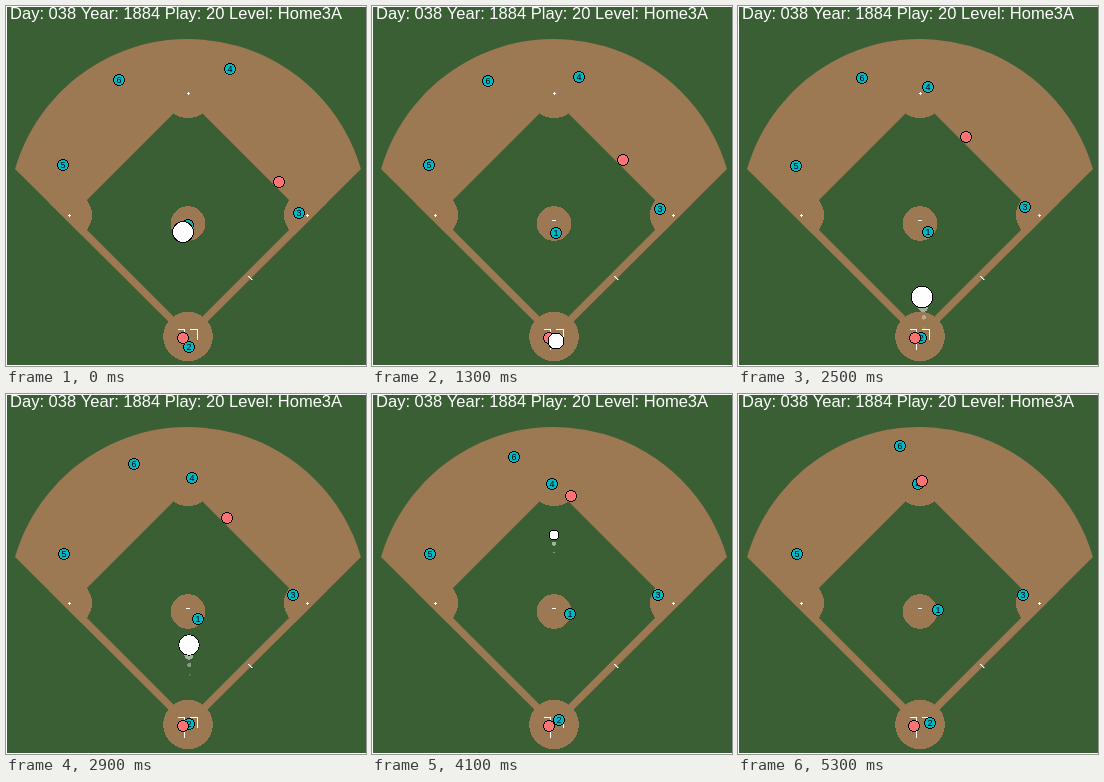
An HTML page with a canvas for the animation above (5400 ms loop, 360 by 360 pixels).

```html
<!DOCTYPE html>
<html lang="en">
<head>
<meta charset="utf-8">
<title>Baseball play</title>
<style>
html, body { margin: 0; width: 100%; height: 100%; overflow: hidden; background: #3a5f34; }
canvas { display: block; width: 360px; height: 360px; }
</style>
</head>
<body>
<canvas id="stage" width="360" height="360"></canvas>
<script>
const ctx = document.getElementById('stage').getContext('2d');
const LOOP = 5400, STEP = 100, END = LOOP - STEP;
const GRASS = '#3a5f34', DIRT = '#9c7853', TEAL = '#00b8c4', PINK = '#ff7272';
const FONT = '"Liberation Sans", Arial, sans-serif';

// Fielders run along Bezier curves given by their control points
const fielders = [
  { label: '1', path: [[182, 219], [180, 237], [201, 220], [200, 216]] },
  { label: '2', path: [[183, 341], [180, 340], [183, 319], [192, 329]] },
  { label: '3', path: [[293, 207], [284, 199], [288, 202], [285, 201]] },
  { label: '4', path: [[224, 63], [210, 67], [178, 87], [180, 90]], end: 4100 },
  { label: '5', path: [[56.7, 159.1], [58.6, 160.1]] },
  { label: '6', path: [[113, 74], [113, 80], [162, 52]] }
];
const batter = [[177.4, 332], [176.45, 332]];
const runner = [[273, 176], [184, 87]];

const mix = (a, b, p) => a + (b - a) * p;

function bezier(points, p) {
  while (points.length > 1) {
    points = points.slice(1).map((q, i) => q.map((v, k) => mix(points[i][k], v, p)));
  }
  return points[0];
}

// Runner gains speed, then slows into the base
const runEase = u => u + 0.57 * u ** 3 * (1 - u);

const PITCHED = 870, THROWN = 2100, CAUGHT = 4700;

function ballAt(t) {
  if (t < PITCHED) return { x: mix(177, 184, t / PITCHED), y: 226 + t / 8, r: 10.5 - t / 300, start: 0 };
  if (t < THROWN) return { x: 184, y: 335, r: 8, start: t };
  if (t >= CAUGHT) return null;
  const n = (t - 2500) / 800;
  return { x: 182 + 2.4 * (1 - Math.min(1, n)) ** 2, y: 291 - 81 * n + 3 * n * n, r: 11 - n - n * n, start: THROWN };
}

// Hard-edged disc, filled row by row
function disc(cx, cy, r, fill) {
  ctx.fillStyle = fill;
  for (let y = Math.floor(cy - r); y < cy + r; y++) {
    const half = Math.sqrt(Math.max(0, r * r - (y + 0.5 - cy) ** 2));
    const left = Math.round(cx - half);
    ctx.fillRect(left, y, Math.round(cx + half) - left, 1);
  }
}

function ringed(x, y, r, fill) {
  disc(x, y, r, '#000');
  disc(x, y, r - 0.9, fill);
}

function rect(x, y, w, h, fill = '#fff') {
  ctx.fillStyle = fill;
  ctx.fillRect(x, y, w, h);
}

function drawField() {
  rect(0, 0, 360, 360);
  rect(1, 1, 359, 358, GRASS);

  // Fan of dirt between the foul lines
  const a = Math.atan2(50, 173);
  const fan = new Path2D();
  fan.arc(182, 213, 180, Math.PI + a, -a);
  fan.lineTo(182, 335);
  fan.closePath();

  ctx.save();
  ctx.clip(fan);
  rect(0, 0, 360, 360, DIRT);
  ctx.fillStyle = GRASS;
  ctx.beginPath();
  for (const [x, y] of [[182, 93], [298, 209], [182, 325], [66, 209]]) ctx.lineTo(x, y);
  ctx.fill();
  disc(182, 87, 25, DIRT);
  disc(63, 209, 23, DIRT);
  disc(301, 209, 23, DIRT);
  ctx.restore();
  disc(182, 217.5, 17.3, DIRT);
  disc(182, 330.5, 24.7, DIRT);

  for (const [x, y] of [[63, 209], [301, 209], [182, 87]]) {
    rect(x - 1, y, 3, 1);
    rect(x, y - 1, 1, 3);
  }
  rect(180, 214, 4, 1);
  for (let i = 0; i < 4; i++) rect(242 + i, 270 + i, 1.5, 1);

  // Batter's boxes
  rect(172, 323, 7, 1);
  rect(178, 323, 1, 21);
  rect(184, 323, 8, 1);
  rect(191, 323, 1, 11);

  ctx.fillStyle = '#fff';
  ctx.font = '16.55px ' + FONT;
  ctx.textAlign = 'left';
  ctx.fillText('Day: 038 Year: 1884 Play: 20 Level: Home3A', 4, 13);
}

function drawPlayer(path, p, fill, label) {
  const [x, y] = bezier(path, p).map(Math.round);
  ringed(x, y, 6, fill);
  if (!label) return;
  ctx.fillStyle = '#000';
  ctx.font = '9px ' + FONT;
  ctx.textAlign = 'center';
  ctx.fillText(label, x, y + 3);
}

function drawBall(t) {
  const ball = ballAt(t);
  if (!ball) return;
  for (let k = 3; k > 0; k--) {
    const past = t - k * STEP;
    if (past < ball.start) continue;
    const { x, y } = ballAt(past);
    disc(x, y, ball.r * 0.44 ** k, `rgba(255,255,255,${0.7 - k * 0.17})`);
  }
  ringed(Math.round(ball.x), Math.round(ball.y), Math.max(1.2, ball.r + 0.3), '#fff');
}

const start = performance.now();
function draw(now) {
  const t = Math.floor((Math.max(0, now - start) % LOOP) / STEP) * STEP;
  drawField();
  for (const { label, path, end = END } of fielders) drawPlayer(path, Math.min(1, t / end), TEAL, label);
  drawPlayer(batter, t / END, PINK);
  drawPlayer(runner, runEase(t / END), PINK);
  drawBall(t);
  requestAnimationFrame(draw);
}
draw(start);
</script>
</body>
</html>
```
